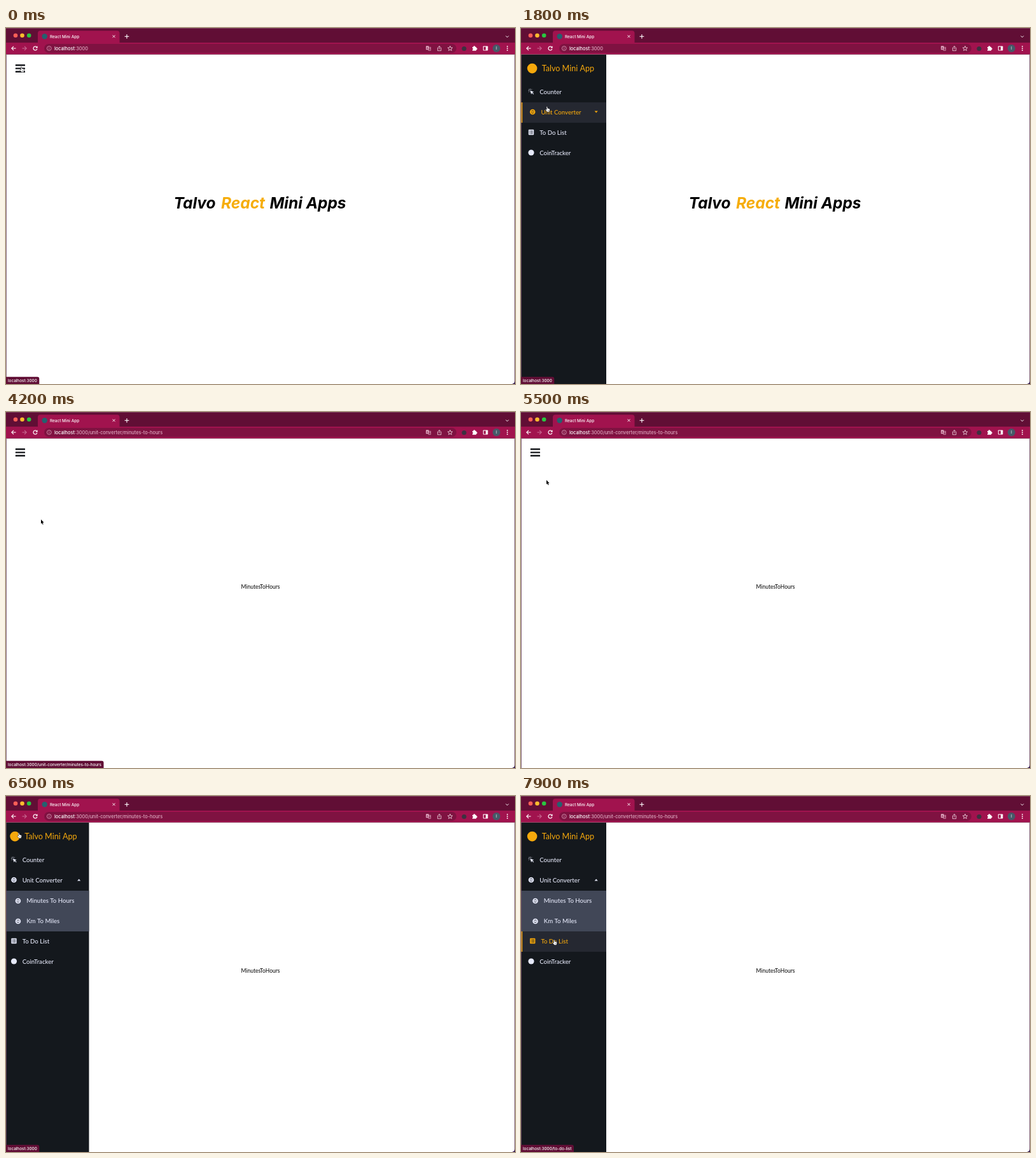
Write an HTML page with a canvas that moves like this. It is 800 px wide and 560 px high and loops after 8000 ms.

```html
<!DOCTYPE html>
<html lang="en">
<head>
<meta charset="utf-8">
<title>React Mini App</title>
<style>
html, body { margin: 0; width: 100%; height: 100%; overflow: hidden; background: #fff; }
canvas { display: block; }
</style>
</head>
<body>
<canvas id="stage" width="800" height="560"></canvas>
<script>
const ctx = document.getElementById('stage').getContext('2d');
const LOOP = 8000, STEP = 100;
const ORANGE = '#f5a80c', PALE = '#e6e9fa', NIGHT = '#14181d', PINK = '#dfa9c0';
const UI = 'Inter, sans-serif', LATO = 'Lato, sans-serif';
const HOST = 'localhost:3000', MINUTES = '/unit-converter/minutes-to-hours';
const BAR_WIDTH = 134, ROW = 32, TOP = 85;
const EXPAND = 2000, CLOSE = 4200, REOPEN = 6200;

// time, x, y of the pointer's tip
const PATH = [
  [0, 24, 61], [600, 24, 61], [700, 35, 110], [1600, 35, 110], [1700, 37, 118],
  [2100, 52, 140], [2400, 52, 140], [2500, 52, 164], [4100, 52, 164],
  [4200, 55, 169], [5300, 55, 169], [5400, 49, 143], [5500, 40, 107],
  [5700, 30, 82], [6000, 20, 58], [6500, 20, 58], [7000, 50, 155], [7900, 52, 226]
];

const MENU = [
  { label: 'Counter', icon: clickIcon, path: '/counter' },
  { label: 'Unit Converter', icon: swapIcon, path: '', caret: true },
  { label: 'Minutes To Hours', icon: swapIcon, path: MINUTES, sub: true },
  { label: 'Km To Miles', icon: swapIcon, path: '/unit-converter/km-to-miles', sub: true },
  { label: 'To Do List', icon: listIcon, path: '/to-do-list' },
  { label: 'CoinTracker', icon: coinIcon, path: '/coin-tracker' }
];

function rect(x, y, w, h, color, radius = 0) {
  ctx.fillStyle = color;
  ctx.beginPath();
  ctx.roundRect(x, y, w, h, radius);
  ctx.fill();
}

function disc(x, y, r, color) {
  ctx.fillStyle = color;
  ctx.beginPath();
  ctx.arc(x, y, r, 0, 7);
  ctx.fill();
}

function ring(x, y, r, color, width, from = 0, to = 2 * Math.PI) {
  ctx.strokeStyle = color;
  ctx.lineWidth = width;
  ctx.beginPath();
  ctx.arc(x, y, r, from, to);
  ctx.stroke();
}

function trace(points) {
  ctx.beginPath();
  points.forEach(([x, y]) => ctx.lineTo(x, y));
}

function line(points, color, width = 1) {
  ctx.strokeStyle = color;
  ctx.lineWidth = width;
  trace(points);
  ctx.stroke();
}

function poly(points, color) {
  ctx.fillStyle = color;
  trace(points);
  ctx.fill();
}

function text(str, x, y, font, color, align = 'left') {
  ctx.font = font;
  ctx.fillStyle = color;
  ctx.textAlign = align;
  ctx.fillText(str, x, y);
  return ctx.measureText(str).width;
}

function at(x, y, draw) {
  ctx.save();
  ctx.translate(x, y);
  draw();
  ctx.restore();
}

// cubic-bezier(.25, .1, .25, 1)
function ease(p) {
  if (p <= 0) return 0;
  if (p >= 1) return 1;
  let lo = 0, hi = 1;
  for (let i = 0; i < 24; i++) {
    const s = (lo + hi) / 2, u = 1 - s;
    if (0.75 * u * u * s + 0.75 * u * s * s + s ** 3 < p) lo = s; else hi = s;
  }
  const u = 1 - lo;
  return 0.3 * u * u * lo + 3 * u * lo * lo + lo ** 3;
}

function pointer(t) {
  const i = PATH.findIndex(k => k[0] > t);
  if (i < 0) return PATH[PATH.length - 1].slice(1);
  const [t0, x0, y0] = PATH[i - 1], [t1, x1, y1] = PATH[i];
  const p = (t - t0) / (t1 - t0);
  return [x0 + (x1 - x0) * p, y0 + (y1 - y0) * p];
}

function clickIcon(color) {
  poly([[-1.8, -1.8], [4.2, 0.4], [1.9, 1.5], [4.2, 3.8], [3.4, 4.6], [1.1, 2.3], [0.2, 4.4]], color);
  line([[-4.3, -1.6], [-2.9, -1.6]], color, 0.9);
  line([[-1.4, -4.3], [-1.4, -2.9]], color, 0.9);
  line([[-3.7, -3.9], [-2.7, -2.9]], color, 0.9);
  line([[0.9, -3.7], [0.1, -2.8]], color, 0.9);
  line([[-3.7, 0.8], [-2.8, 0]], color, 0.9);
}

function swapIcon(color) {
  disc(0, 0, 4.3, color);
  ring(0, 0, 2, '#20242c', 0.9, -2.7, -0.3);
  ring(0, 0, 2, '#20242c', 0.9, 0.45, 2.85);
}

function listIcon(color) {
  rect(-4.2, -4.2, 8.4, 8.4, color, 1);
  for (const y of [-2, 0, 2]) {
    rect(-2.8, y - 0.4, 0.9, 0.8, NIGHT);
    rect(-1.2, y - 0.4, 4, 0.8, NIGHT);
  }
}

function coinIcon(color) {
  disc(0, 0, 4.6, color);
}

function toolbarIcons() {
  const ink = '#f4dfe8';
  line([[15.5, 32], [9, 32]], '#fff', 1.1);
  line([[12, 28.8], [8.8, 32], [12, 35.2]], '#fff', 1.1);
  line([[25.5, 32], [32, 32]], '#c76b93', 1.1);
  line([[29, 28.8], [32.2, 32], [29, 35.2]], '#c76b93', 1.1);
  ring(46, 32, 3, '#fff', 1.2, 0.3, 5.4);
  poly([[49.6, 28.3], [49.6, 31.6], [46.3, 31.6]], '#fff');
  ring(67.8, 32, 3.4, PINK, 0.8);
  rect(67.4, 31.4, 0.8, 2.4, PINK);
  rect(67.4, 30, 0.8, 0.8, PINK);

  rect(660, 28.3, 4.6, 6, PINK, 0.7);
  ctx.strokeStyle = PINK;
  ctx.lineWidth = 0.7;
  ctx.strokeRect(664, 30.2, 3.6, 5.4);
  text('A', 662.2, 33, '600 4px ' + UI, '#7f1241', 'center');
  line([[664.8, 32], [667, 32], [665, 34.6]], PINK, 0.6);

  line([[679.6, 31], [678.4, 31], [678.4, 35.7], [683.8, 35.7], [683.8, 31], [682.6, 31]], ink, 0.8);
  line([[681.1, 33.5], [681.1, 28.6]], ink, 0.8);
  line([[679.6, 30], [681.1, 28.4], [682.6, 30]], ink, 0.8);

  const star = [];
  for (let i = 0; i <= 10; i++) {
    const a = i * Math.PI / 5 - Math.PI / 2, r = i % 2 ? 1.7 : 4;
    star.push([698 + r * Math.cos(a), 32.3 + r * Math.sin(a)]);
  }
  line(star, ink, 0.8);

  disc(720, 32.5, 3.6, '#3c3140');
  rect(733, 29.8, 6.2, 6, '#fff', 0.8);
  disc(736, 29.6, 1.4, '#fff');
  disc(739.3, 32.8, 1.4, '#fff');
  disc(733.1, 33, 1, '#a1134e');
  rect(749.8, 28.4, 7.6, 7.2, '#fff', 0.8);
  rect(750.8, 29.6, 3.2, 5, '#a1134e');
  disc(770.8, 32, 6, '#465968');
  text('I', 770.8, 34.3, '6.5px ' + UI, '#fff', 'center');
  for (const y of [29, 32, 35]) disc(788, y, 0.9, '#fff');
}

function browser(path) {
  rect(0, 0, 800, 24, '#610e35');
  rect(0, 0, 800, 0.8, '#84506a');
  disc(15, 11.7, 3.3, '#ff5f57');
  disc(25.5, 11.7, 3.3, '#febc2e');
  disc(36.2, 11.7, 3.3, '#28c840');
  rect(50, 4.3, 128.5, 22, '#a1134e', [4, 4, 0, 0]);
  disc(60.7, 13.3, 4.2, '#24616f');
  text('React Mini App', 69, 15.6, '500 6.4px ' + UI, '#fff');
  line([[167.5, 11.2], [171.5, 15.2]], '#fff', 0.9);
  line([[171.5, 11.2], [167.5, 15.2]], '#fff', 0.9);
  line([[186.5, 13.3], [193.3, 13.3]], '#fff', 1.1);
  line([[189.9, 9.9], [189.9, 16.7]], '#fff', 1.1);
  line([[785.6, 12.4], [787.8, 14.6], [790, 12.4]], '#fff', 1);

  rect(0, 23, 800, 18.7, '#a1134e');
  rect(60, 25, 648, 14.2, '#7f1241', 7.1);
  const font = '500 7.35px ' + UI;
  const w = text('localhost', 76, 34.7, font, '#fff');
  text(':3000' + path, 76 + w, 34.7, font, PINK);
  toolbarIcons();
  rect(0, 41, 800, 0.8, '#8b5069');
}

function page(converted) {
  rect(0, 0, 800, 560, '#fff');
  for (const y of [57.3, 62.4, 67.5]) rect(14.8, y, 15.2, 2.4, '#16181c', 0.5);
  if (converted) {
    text('MinutesToHours', 400, 278.2, '8.5px ' + LATO, '#000', 'center');
    return;
  }
  const font = 'italic 700 24.5px ' + UI;
  text('Talvo', 263.5, 283.5, font, '#000');
  text('React', 338, 283.5, font, '#f6ad0b');
  text('Mini Apps', 414.5, 283.5, font, '#000');
}

function sidebar(rows, hover, open) {
  rect(0, 41.7, BAR_WIDTH, 520, NIGHT);
  disc(17.6, 63.6, 7.8, ORANGE);
  text('Talvo Mini App', 32.7, 68, '12.6px ' + LATO, ORANGE);
  rows.forEach((row, i) => {
    const y = TOP + i * ROW, mid = y + ROW / 2, on = i === hover;
    const lit = on && !row.sub;
    const color = lit ? ORANGE : PALE;
    if (row.sub) rect(0, y, BAR_WIDTH, ROW, on ? '#c78b06' : '#414757');
    if (lit) {
      rect(0, y, BAR_WIDTH, ROW, '#252831');
      rect(0, y, 2.2, ROW, ORANGE);
    }
    const shift = row.sub ? 6.5 : lit ? 2.2 : 0;
    at(16 + shift, mid - (row.sub ? 0 : 1), () => row.icon(color));
    text(row.label, 29.2 + shift, mid + 3.4, '500 9.65px ' + LATO, color);
    if (row.caret) {
      const d = open ? -1.4 : 1.4;
      poly([[115.6, mid - 1 - d], [120.8, mid - 1 - d], [118.2, mid - 1 + d]], color);
    }
  });
}

function status(url, alpha) {
  ctx.globalAlpha = alpha;
  const font = '500 6.35px ' + UI;
  ctx.font = font;
  rect(0, 548.7, ctx.measureText(url).width + 6.5, 12, '#610e35', [0, 3, 0, 0]);
  text(url, 3, 556.8, font, '#fff');
  ctx.globalAlpha = 1;
}

function outlined(points, fill, edge, width) {
  trace(points);
  ctx.closePath();
  ctx.lineJoin = 'round';
  ctx.lineWidth = width;
  ctx.strokeStyle = edge;
  ctx.stroke();
  ctx.fillStyle = fill;
  ctx.fill();
  ctx.lineJoin = 'miter';
}

function arrow() {
  outlined([[0, 0], [0, 6.8], [1.5, 5.4], [2.6, 8], [3.7, 7.5], [2.6, 5], [4.6, 5]], '#000', '#fff', 1);
}

function hand() {
  outlined([[-0.6, 0.3], [0.4, 0.3], [0.9, 3.1], [3.9, 3.7], [4.4, 5], [3.6, 8.2],
    [0.5, 8.2], [-2, 5.2], [-1.4, 4.6], [0, 5.4]], '#fff', '#1b1b1f', 1);
  line([[1.6, 5.4], [1.7, 7]], '#1b1b1f', 0.4);
  line([[2.8, 5.4], [2.8, 7]], '#1b1b1f', 0.4);
}

function statusAlpha(t) {
  if (t < 5100 || t >= REOPEN) return 1;
  return t < 5200 ? 0.4 : 0;
}

function draw(t) {
  const closed = t >= CLOSE && t < REOPEN;
  const open = t >= EXPAND;
  const [x, y] = pointer(t);
  const rows = open ? MENU : MENU.filter(row => !row.sub);
  const hover = closed ? -1 : Math.floor((y - TOP) / ROW);
  const start = t < CLOSE ? 81 : REOPEN - 19;
  // the panel starts a whole stage width away
  const offset = -800 * (1 - ease((t - start) / 350));

  page(t >= CLOSE);
  if (!closed && offset > -BAR_WIDTH) at(offset, 0, () => sidebar(rows, hover, open));
  browser(t >= CLOSE ? MINUTES : '');
  rect(0, 42, 0.8, 518, '#6d4862');
  rect(799.2, 42, 0.8, 518, '#6d4862');
  poly([[800, 555.5], [800, 560], [795.5, 560], [798.4, 558.6]], '#30154a');

  const path = closed ? MINUTES : hover < 0 ? '' : rows[hover].path;
  const alpha = statusAlpha(t);
  if (alpha) status(HOST + path, alpha);
  at(x, y, closed ? arrow : hand);
}

function tick() {
  const t = performance.now() % LOOP;
  draw(Math.floor(t / STEP) * STEP);
  requestAnimationFrame(tick);
}
tick();
</script>
</body>
</html>
```
